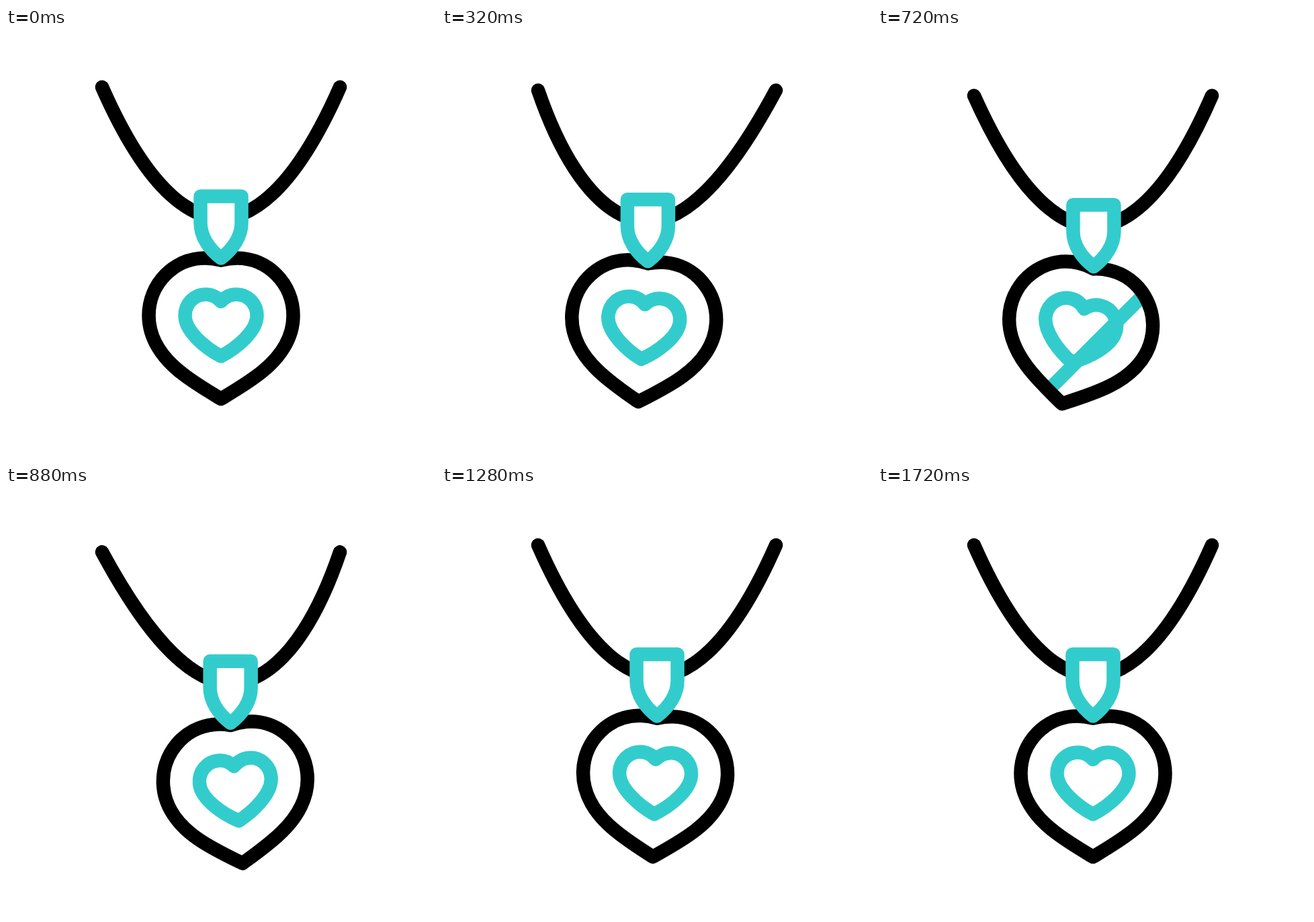
An HTML page for the animation above (1840 ms loop, 640 px wide and 640 px high).

```html
<!DOCTYPE html>
<html lang="en">
<head>
<meta charset="utf-8">
<title>Swinging heart necklace</title>
<style>
  html, body { margin: 0; height: 100%; overflow: hidden; background: #fff; }
  svg { display: block; width: 100%; height: 100%; fill: none; stroke: #000;
        stroke-width: 20.5; stroke-linecap: round; stroke-linejoin: round; }
  .teal { stroke: #3cc; }
</style>
</head>
<body>
<svg viewBox="0 0 640 640">
  <defs>
    <path id="heart" d="M320 345.7C312 343.5 304 342.5 296 342.5C250 342.5 212.5 381 212.5 428
      C212.5 463 234 491 257 510C276 526 300 540 320 552C340 540 364 526 383 510
      C406 491 427.5 463 427.5 428C427.5 381 390 342.5 344 342.5C336 342.5 328 343.5 320 345.7Z"/>
    <clipPath id="inside"><use id="mask" href="#heart"/></clipPath>
  </defs>
  <path id="cord"/>
  <g id="pendant">
    <path class="teal" d="M320 407C314.5 401 306 396.5 297 396.5C280 396.5 266.5 410.5 266.5 428
      C266.5 452 298 477 320 488.5C342 477 373.5 452 373.5 428C373.5 410.5 360 396.5 343 396.5
      C334 396.5 325.5 401 320 407Z"/>
  </g>
  <g clip-path="url(#inside)"><path id="shine" class="teal" d="M-400 400L400 -400"/></g>
  <use id="rim" href="#heart"/>
  <path id="bail" class="teal" fill="#fff" d="M289.5 250.5H350.5V290C350.5 310 338 329 320 342.5
    C302 329 289.5 310 289.5 290Z"/>
</svg>
<script>
  const LOOP = 1840, STEP = 40;
  // Keys are [time in ms, value]
  const SWAY = [[105, 0], [500, -24], [865, 14.2], [1235, 0]];
  const DROP = [[95, 0], [640, 12.7], [750, 12.7], [1225, 0]];
  const TILT = [[200, 0], [610, 19.2], [1010, -13], [1400, 6], [1720, 0]];

  const el = id => document.getElementById(id);
  const set = (id, name, value) => el(id).setAttribute(name, value);

  function valueAt(keys, t) {
    const i = keys.findIndex(key => key[0] > t);
    if (i < 0) return keys[keys.length - 1][1];
    if (i === 0) return keys[0][1];
    const [t0, a] = keys[i - 1], [t1, b] = keys[i];
    const p = (t - t0) / (t1 - t0);
    return a + (b - a) * p * p * (3 - 2 * p);
  }

  function cordPath(x, y) {
    const side = dir => {
      const at = (dx, py, follow) => `${320 + dir * dx + x * follow} ${py + y}`;
      return `M${at(177, 88, 0)}C${at(140, 172, 0.6)} ${at(91, 253, 1)} ${at(31, 277, 1)}`;
    };
    return side(-1) + side(1);
  }

  function draw(now) {
    const t = Math.floor(now % LOOP / STEP) * STEP;
    const x = valueAt(SWAY, t), y = valueAt(DROP, t);
    const move = `translate(${x} ${y})`;
    const swing = `${move} rotate(${valueAt(TILT, t)} 320 346)`;
    const shine = 321 + (t - 560) * 0.47;

    set('cord', 'd', cordPath(x, y));
    set('bail', 'transform', move);
    for (const id of ['pendant', 'rim', 'mask']) set(id, 'transform', swing);
    set('shine', 'transform', `translate(${shine} ${shine})`);
  }

  const start = performance.now();
  function tick() {
    draw(performance.now() - start);
    requestAnimationFrame(tick);
  }
  tick();
</script>
</body>
</html>
```
